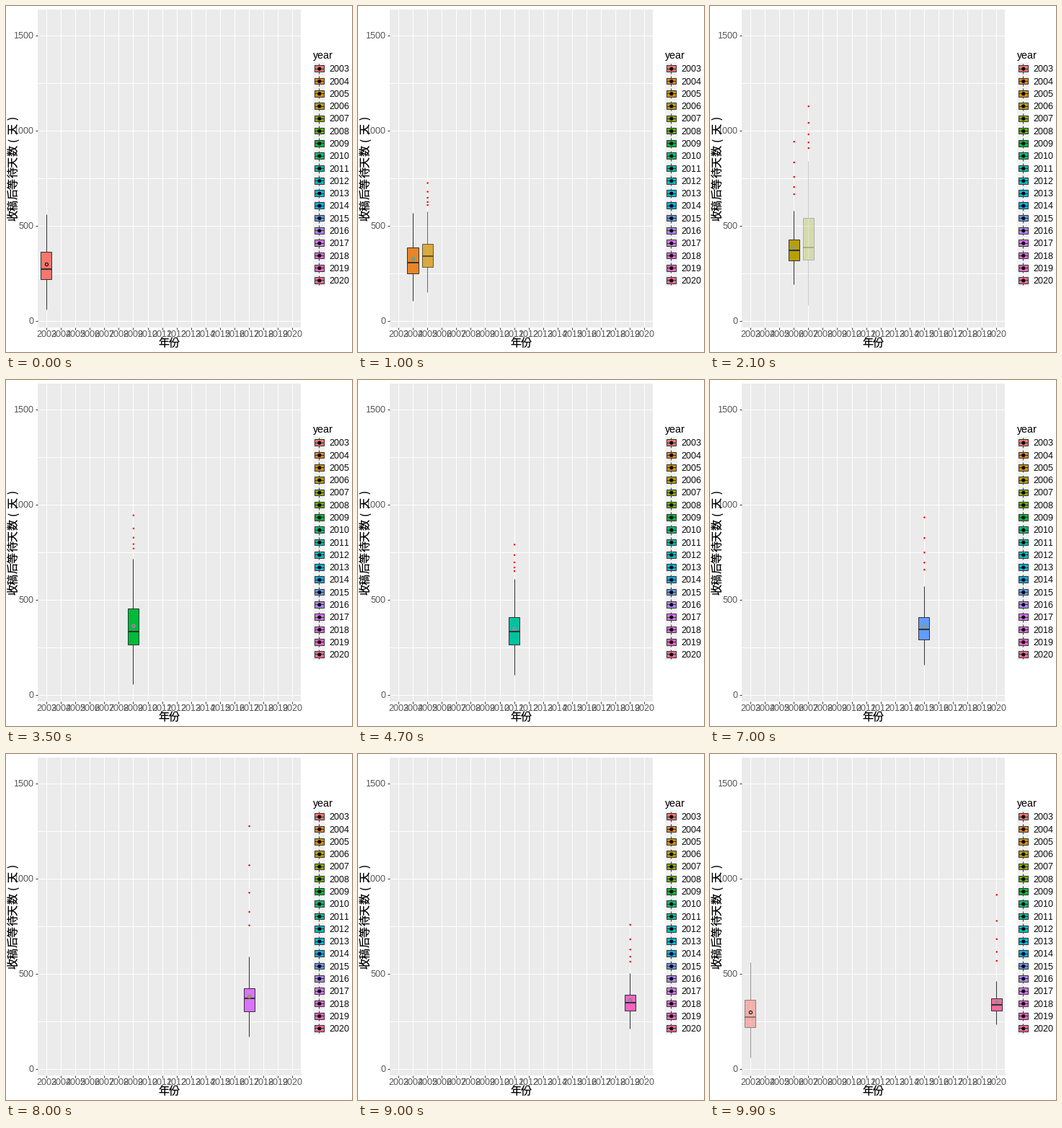
A matplotlib script for the animation above (10 s loop, 480 px wide and 480 px high).

```python
import math

import matplotlib.pyplot as plt
import numpy as np
from matplotlib.animation import FuncAnimation
from matplotlib.patches import Circle, Rectangle

SIZE, DPI = 480, 100
PT = 72 / DPI  # points per pixel
SANS, CJK = "Liberation Sans", "Noto Sans CJK JP"
DARK = "#333333"
YEARS = range(2003, 2021)
N = len(YEARS)

# quartiles in days at a few turning points: year -> (q1, median, q3)
QUARTILES = {
    2003: (219, 274, 363), 2006: (317, 373, 428), 2007: (322, 388, 540),
    2009: (264, 335, 454), 2011: (264, 335, 409), 2013: (277, 320, 394),
    2017: (304, 373, 425), 2020: (306, 338, 371),
}
# highest outlier of each year from 2005 on
TOPS = [727, 944, 1130, 930, 946, 1196, 792, 802,
        1122, 1560, 935, 820, 1278, 954, 760, 917]

# first frame of each change; the early ones last three steps, the rest two
CHANGES = ([(s, 3) for s in range(3, 64, 6)]
           + [(s, 2) for s in range(69, 100, 5)])

plt.rcParams.update({"text.hinting": "native", "text.hinting_factor": 1})


def hue_color(i):
    """Evenly spaced hue in polar LUV with luminance 65 and chroma 100."""
    lum, chroma, angle = 65, 100, math.radians(15 + 360 * i / N)
    y = ((lum + 16) / 116) ** 3
    u = chroma * math.cos(angle) / (13 * lum) + 0.1978
    v = chroma * math.sin(angle) / (13 * lum) + 0.4683
    x, z = 9 * y * u / (4 * v), y * (12 - 3 * u - 20 * v) / (4 * v)
    rgb = np.clip([3.2406 * x - 1.5372 * y - 0.4986 * z,
                   -0.9689 * x + 1.8758 * y + 0.0415 * z,
                   0.0557 * x - 0.2040 * y + 1.0570 * z], 0, 1)
    return tuple(np.where(rgb > 0.0031308, 1.055 * rgb ** (1 / 2.4) - 0.055,
                          12.92 * rgb))


def year_stats(year):
    """Box, whiskers, mean and outliers of one year."""
    q1, mid, q3 = (np.interp(year, list(QUARTILES), column)
                   for column in zip(*QUARTILES.values()))
    spread = q3 - q1
    low, high = q1 - 1.1 * spread, q3 + 1.38 * spread
    mean = (q1 + mid + q3) / 3 + 14
    outliers = []
    if year >= 2005:
        top = TOPS[year - 2005]
        outliers = [high + (top - high) * 0.7 ** k for k in range(5)]
    return low, q1, mid, q3, high, mean, outliers


FILLS = [hue_color(i) for i in range(N)]
STATS = [year_stats(year) for year in YEARS]


def px(i):
    return 55.93 + 20.082 * i


def py(v):
    return 437 - 0.264 * v


fig = plt.figure(figsize=(SIZE / DPI, SIZE / DPI), dpi=DPI, facecolor="white")
ax = fig.add_axes([0, 0, 1, 1])
ax.set_xlim(0, SIZE)
ax.set_ylim(SIZE, 0)
ax.axis("off")


def rect(x0, y0, x1, y1, fill, edge="none", alpha=None, z=1):
    return ax.add_patch(Rectangle(
        (x0, y0), x1 - x0, y1 - y0, facecolor=fill, edgecolor=edge,
        linewidth=PT, alpha=alpha, zorder=z))


def line(x0, y0, x1, y1, color=DARK, width=1, alpha=None, z=1):
    return ax.plot([x0, x1], [y0, y1], color=color, linewidth=width * PT,
                   alpha=alpha, solid_capstyle="butt", zorder=z)[0]


def dot(x, y, r, fill, edge="none", z=6):
    # lines snap to pixel indices, so circles sit half a pixel further
    return ax.add_patch(Circle((x + 0.5, y + 0.5), r, facecolor=fill,
                               edgecolor=edge, linewidth=PT, zorder=z))


def text(x, y, s, size, font=SANS, color="black", **kw):
    ax.text(x, y, s, fontsize=size * PT, family=font, color=color,
            va="baseline", zorder=8, **kw)


def draw_panel():
    left, right, top, bottom = 44, 409, 5, 446
    rect(left, top, right, bottom, "#EBEBEB")
    for v in range(0, 1501, 250):
        line(left, py(v), right, py(v), "white")
    for v in range(0, 1501, 500):
        line(left - 3, py(v), left, py(v))
        text(39, py(v) + 4.3, str(v), 12, color="#4D4D4D", ha="right")
    for i, year in enumerate(YEARS):
        line(px(i), top, px(i), bottom, "white")
        line(px(i), bottom, px(i), bottom + 3)
        text(px(i), 459, str(year), 12, color="#4D4D4D", ha="center")
    text(227, 473, "年份", 15, CJK, ha="center")
    for i, char in enumerate("收稿后等待天数(天)"):
        text(15, 291 - 15 * i, char, 15, CJK, ha="center", rotation=90,
             rotation_mode="anchor")


def draw_legend():
    text(426, 73, "year", 15)
    x, key = 434.3, 17.28
    for i, year in enumerate(YEARS):
        y = 86.7 + key * i
        rect(x - key / 2, y - key / 2, x + key / 2, y + key / 2, "#F2F2F2")
        for side in (-1, 1):
            line(x, y + side * 0.25 * key, x, y + side * 0.4 * key, z=2)
        rect(x - 6.48, y - 4.32, x + 6.48, y + 4.32, FILLS[i], DARK, z=3)
        line(x - 6.48, y, x + 6.48, y, z=4)
        dot(x, y, 2.6, "black", z=5)
        text(448, y + 4.6, str(year), 12)


def draw_box(i, alpha=1):
    low, q1, mid, q3, high, mean, outliers = STATS[i]
    x, half = px(i), 7.56
    parts = [
        line(x, py(low), x, py(q1), alpha=alpha, z=3),
        line(x, py(q3), x, py(high), alpha=alpha, z=3),
        rect(x - half, py(q3), x + half, py(q1), FILLS[i], DARK, alpha, z=4),
        line(x - half, py(mid), x + half, py(mid), width=2, alpha=alpha, z=5),
    ]
    parts += [dot(x, py(v), 1.25, "red") for v in outliers]
    if i == 0:
        parts.append(dot(x, py(mean), 2.1, "none", "black", z=7))
    elif alpha == 1:
        opposite = FILLS[(i + N // 2) % N]
        parts.append(dot(x, py(mean), 2.1, "none", opposite, z=7))
    return parts


def smooth(t):
    return t * t * (3 - 2 * t)


live = []


def update(frame):
    while live:
        live.pop().remove()
    current, fade = 0, 0
    for i, (start, steps) in enumerate(CHANGES):
        part = (frame - start + 1) / steps
        if part >= 1:
            current = i + 1
        elif part > 0:
            fade = smooth(part)
    live.extend(draw_box(current))
    if fade:
        live.extend(draw_box((current + 1) % N, fade))
    return live


draw_panel()
draw_legend()
anim = FuncAnimation(fig, update, frames=100, interval=100, repeat=True,
                     repeat_delay=0, blit=False)
plt.show()
```
